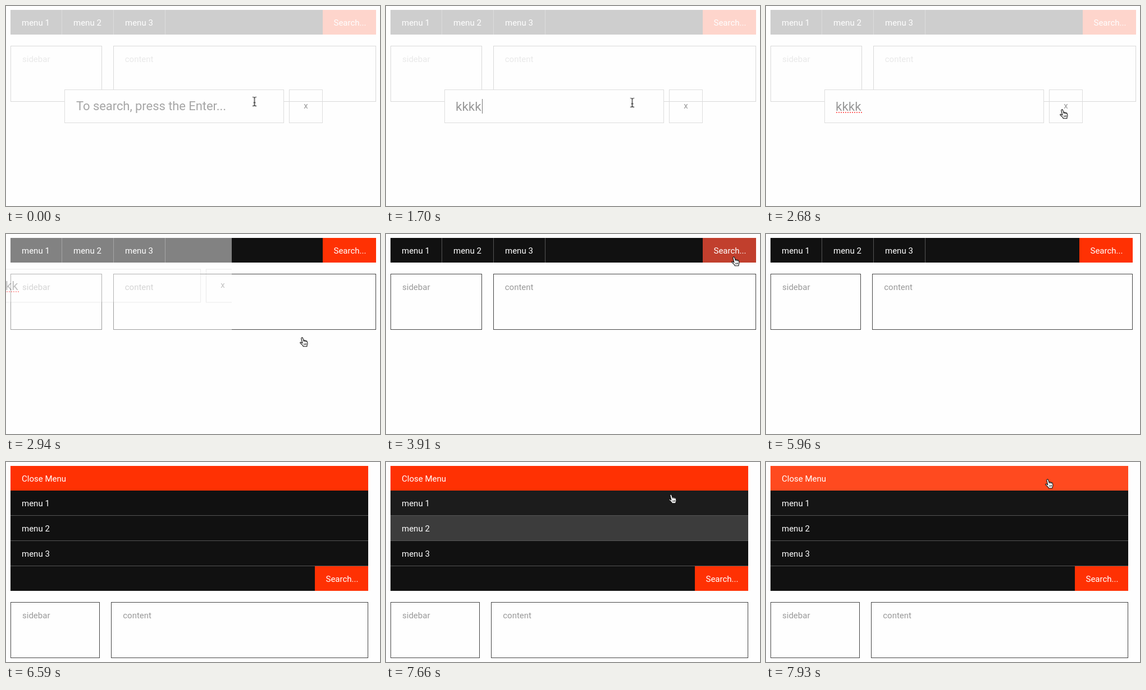
Write an HTML page that moves like this. It is 666x357 px and loops after 8 s.

```html
<!DOCTYPE html>
<html lang="en">
<head>
<meta charset="utf-8">
<title>Responsive menu with search</title>
<style>
@property --w { syntax: "<length>"; inherits: true; initial-value: 651px; }
@property --tall { syntax: "<number>"; inherits: true; initial-value: 0; }
@property --open { syntax: "<number>"; inherits: true; initial-value: 1; }

html, body { margin: 0; width: 100%; height: 100%; overflow: hidden; background: #fefefe; }
body { font: 15px/46px Roboto, sans-serif; }
* { box-sizing: border-box; }
div, svg { position: absolute; white-space: nowrap; }

.page, .page *, .overlay, .overlay *, .cursor, .cursor * {
  animation: 8s step-end -20ms infinite;
}

/* page layout: --w is the window width, --tall switches to the stacked menu */
.page { left: 8px; top: 7px; width: var(--w); height: 350px; color: #fff; animation-name: resize; }
.nav { width: 100%; height: calc(44px + 179px * var(--tall)); background: #111; }
.search {
  right: 0; top: calc(179px * var(--tall)); width: 95px; height: 44px;
  padding-left: 19.5px; background: #ff3103; animation-name: search;
}
.row { opacity: calc(1 - var(--tall)); display: flex; }
.row div { position: static; width: 92px; height: 44px; padding-left: 20px; border-right: 1px solid #555; }
.stack { width: 100%; opacity: var(--tall); }
.stack div { position: static; height: 45px; padding-left: 20px; border-bottom: 1px solid #555; }
.stack .close { height: 44px; border: 0; background: #ff3103; animation-name: close; }
.stack .one { animation-name: one; }
.stack .two { animation-name: two; }
.box {
  top: calc(64px + 179px * var(--tall)); height: 100px; padding-left: 20px;
  border: 1px solid #444; color: #999;
}
.sidebar { left: 0; width: 25%; }
.content { left: calc(25% + 20px); right: 0; }

/* search overlay: shrinks into the corner as --open falls */
.overlay {
  left: 0; top: 0; overflow: hidden;
  width: calc(667px * var(--open)); height: calc(357px * var(--open));
  opacity: var(--open); background: rgba(254, 254, 254, .8); color: #999;
  animation-name: shut;
}
.form {
  left: 0; top: 0;
  transform: translate(calc(373px * (var(--open) - 1)), calc(218px * (var(--open) - 1)));
}
.field, .exit { top: 149px; height: 60px; border: 1px solid #ddd; }
.field { left: 104px; width: 391px; background: #fefefe; font-size: 22px; line-height: 58px; }
.exit { left: 504px; width: 60px; text-align: center; line-height: 56px; }
.hint { left: 20px; letter-spacing: -.06px; color: #a6a6a6; animation-name: hint; }
.typed {
  box-sizing: content-box; left: 19px; top: 16px; width: 1px; height: 26px;
  overflow: hidden; border-right: 1px solid transparent;
  font-size: 22.5px; line-height: 26px; animation-name: type;
}
.spell {
  left: 20px; top: 39px; width: 46px; height: 2px; opacity: 0;
  background: repeating-linear-gradient(90deg, #f66 0 2.5px, transparent 2.5px 4px);
  animation-name: spell;
}

.cursor { left: 0; top: 0; width: 1px; height: 1px; overflow: visible; animation-name: move; }
.cursor g { opacity: 0; stroke-linejoin: round; }
.cursor .beam { animation-name: beam; }
.cursor .arrow { animation-name: arrow; }
.cursor .hand { animation-name: hand; }

@keyframes type {
  0% { width: 1px; border-color: transparent; }
  2.25% { width: 1px; border-color: #777; }
  9% { width: 1px; border-color: transparent; }
  14.625% { width: 12.4px; border-color: #777; }
  16.875% { width: 23.8px; border-color: #777; }
  19.125% { width: 35.2px; border-color: #777; }
  21.25% { width: 46.6px; border-color: #777; }
  33.5%, 100% { width: 46.6px; border-color: transparent; }
}
@keyframes hint { 0% { opacity: 1; } 14.625%, 100% { opacity: 0; } }
@keyframes spell { 0% { opacity: 0; } 33.5%, 100% { opacity: 1; } }
@keyframes shut {
  0% { --open: 1; }
  35.75% { --open: .87; }
  36.75% { --open: .603; }
  37.875% { --open: .2; }
  39%, 100% { --open: 0; }
}
@keyframes resize {
  0% { --w: 651px; --tall: 0; }
  74.5% { --w: 645px; --tall: 0; }
  75.625% { --w: 643px; --tall: 0; }
  76.75% { --w: 641px; --tall: 0; }
  77.875% { --w: 640px; --tall: 1; }
  79% { --w: 639px; --tall: 1; }
  81.25% { --w: 638px; --tall: 1; }
  82.375%, 100% { --w: 637px; --tall: 1; }
}
@keyframes search {
  0% { background: #ff3103; }
  46.75% { background: #e8351a; }
  47.75% { background: #cd3b27; }
  48.875% { background: #c13f2d; }
  52.125% { background: #d23b22; }
  53.25% { background: #ef350e; }
  54.375%, 100% { background: #ff3103; }
}
@keyframes two {
  0% { background: #111; }
  92.5% { background: #1a1a1a; }
  93.625% { background: #343434; }
  94.625% { background: #434343; }
  95.75% { background: #3c3c3c; }
  96.875% { background: #202020; }
  98% { background: #131313; }
  99.125%, 100% { background: #111; }
}
@keyframes one {
  0% { background: #111; }
  95.75% { background: #1c1c1c; }
  96.875% { background: #383838; }
  98% { background: #282828; }
  99.125%, 100% { background: #151515; }
}
@keyframes close {
  0% { background: #ff3103; }
  98% { background: #ff390c; }
  99.125%, 100% { background: #ff4a1f; }
}
@keyframes move {
  0% { transform: translate(442.5px, 170.5px); }
  1.125% { transform: translate(440.5px, 171.5px); }
  2.25% { transform: translate(438.5px, 172.5px); }
  25.75% { transform: translate(441.5px, 176.5px); }
  26.875% { transform: translate(450.5px, 188.5px); }
  28% { transform: translate(466.5px, 198.5px); }
  29.125% { transform: translate(483.5px, 202.5px); }
  30.25% { transform: translate(497px, 194px); }
  31.25% { transform: translate(509px, 192px); }
  32.375% { transform: translate(519px, 187px); }
  33.5% { transform: translate(523px, 184px); }
  41.25% { transform: translate(528px, 178px); }
  42.375% { transform: translate(540px, 158px); }
  43.375% { transform: translate(556px, 130px); }
  44.5% { transform: translate(574px, 100px); }
  45.625% { transform: translate(592px, 70px); }
  46.75% { transform: translate(606px, 46px); }
  47.75% { transform: translate(612px, 42px); }
  48.875% { transform: translate(615px, 40px); }
  50% { transform: translate(628px, 38px); }
  51% { transform: translate(648px, 36px); }
  52.125% { transform: translate(661px, 37px); }
  92.5% { transform: translate(631px, 118px); }
  93.625% { transform: translate(590px, 106px); }
  94.625% { transform: translate(542px, 97px); }
  95.75% { transform: translate(503px, 57px); }
  96.875% { transform: translate(499px, 53px); }
  98% { transform: translate(497px, 42px); }
  99.125%, 100% { transform: translate(497px, 30px); }
}
@keyframes beam { 0% { opacity: 1; } 30.25%, 100% { opacity: 0; } }
@keyframes arrow {
  0%, 31.25%, 46.75%, 53.25%, 100% { opacity: 0; }
  30.25%, 41.25%, 52.125% { opacity: 1; }
}
@keyframes hand {
  0%, 41.25%, 52.125% { opacity: 0; }
  31.25%, 46.75%, 92.5%, 100% { opacity: 1; }
}
</style>
</head>
<body>
<div class="page">
  <div class="nav"></div>
  <div class="row"><div>menu 1</div><div>menu 2</div><div>menu 3</div></div>
  <div class="stack">
    <div class="close">Close Menu</div>
    <div class="one">menu 1</div>
    <div class="two">menu 2</div>
    <div>menu 3</div>
  </div>
  <div class="search">Search...</div>
  <div class="box sidebar">sidebar</div>
  <div class="box content">content</div>
</div>

<div class="overlay">
  <div class="form">
    <div class="field">
      <div class="hint">To search, press the Enter...</div>
      <div class="typed">kkkk</div>
      <div class="spell"></div>
    </div>
    <div class="exit">x</div>
  </div>
</div>

<svg class="cursor">
  <g class="beam" fill="none">
    <path id="bar" d="M-3.5-8q3 0 3.5 1.5q.5-1.5 3.5-1.5M0-6.5V6.5M-3.5 8q3 0 3.5-1.5q.5 1.5 3.5 1.5M-2 2H2" stroke="#111" stroke-width="1.2"/>
  </g>
  <g class="arrow">
    <path d="M.5.5V14l3.1-2.9 2.2 5 2.2-1-2.2-4.8h4.3z" fill="#111" stroke="#fff"/>
  </g>
  <g class="hand" fill="#fff" stroke="#111" stroke-width="1.1">
    <path d="M3.4 1.2q1.4-1 2.2.7L6.9 6q1.2-.9 2.1.3 1.3-.8 2.1.6 1.6-.4 2.1 1l.7 3.1q.2 2.5-1 4v1.8H6.2l-.4-1.6L1 10.6Q.5 9 2 9.1L4.9 11 2.9 3q-.2-1.2.5-1.8z"/>
    <path d="M6.9 6l.7 2.4M9 6.3l.6 2.2M11.1 6.9l.5 1.9M7.6 11.5l.4 2.8M9.6 11.3l.3 2.8M11.5 11v2.8" fill="none" stroke-width=".9"/>
  </g>
</svg>
</body>
</html>
```
